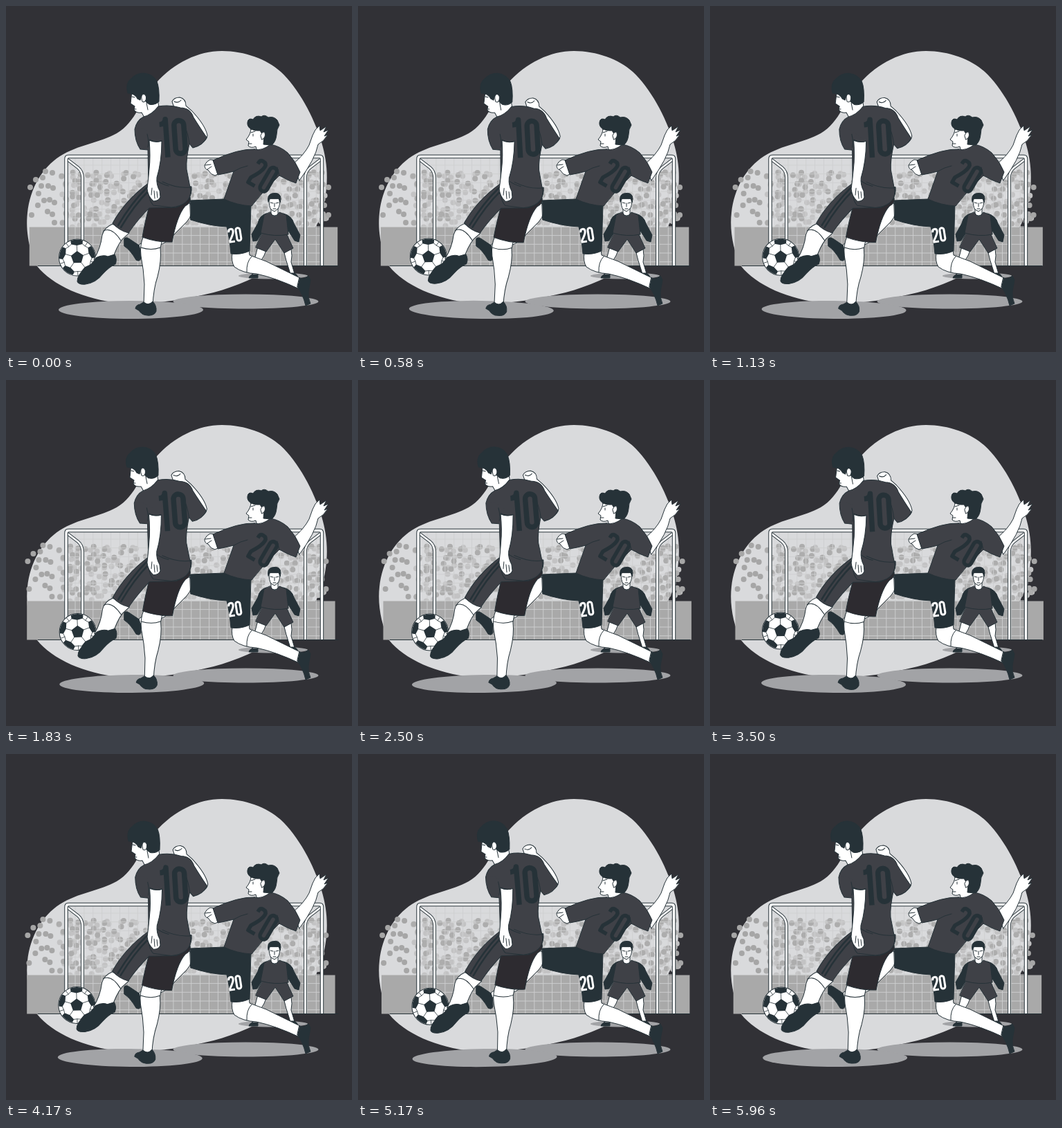
These frames come from a looping animation (500x500 px, 6000 ms). An HTML page:

```html
<!DOCTYPE html>
<html lang="en">
<head>
<meta charset="utf-8">
<title>Football match</title>
<style>
  html, body { margin: 0; width: 100%; height: 100%; overflow: hidden; background: #313136; }
  svg { display: block; width: 100vw; height: 100vh; }
  .line { stroke: #263238; stroke-width: 1; stroke-linejoin: round; stroke-linecap: round; }
  .skin { fill: #fff; }
  .shirt { fill: #3f4147; }
  .dark { fill: #263238; }
  .shorts { fill: #2d2b30; }
  .shade { fill: #a2a3a6; }
  .open { fill: none; }
  .digit { fill: none; stroke: #263238; stroke-linejoin: round; }
</style>
</head>
<body>
<svg viewBox="0 0 500 500">
  <defs>
    <clipPath id="ballClip"><circle r="26"/></clipPath>
    <path id="post" d="M87 375V221Q87 217.5 90.500 217.5H453Q456.500 217.500 456.500 221V375"/>
    <path id="stays" d="M89 222L104 233.500Q110.500 239 110.500 248V375M454.500 222L439.500 233.500Q432.500 239 432.500 248V375"/>
  </defs>

  <path fill="#d9dadc" d="M312 65C345 65 377 77 397 95C422 118 445 160 456 197C466 230 467 264 455 303C447 328 423 350 392 372C367 391 333 405 300 414C255 425 205 433 165 429C115 425 66 403 45 376C34 355 28 325 31 299C35 263 52 234 78 217C103 201 137 197 160 184C188 168 195 134 217 111C243 82 278 65 312 65Z"/>

  <g id="stand">
    <g id="crowd"></g>
    <path fill="#a9a9a9" d="M33.800 319.500H479.200V375.500H33.800Z"/>
  </g>

  <path id="net" fill="none" stroke="#cfd0d1" stroke-width=".9"/>
  <path class="line open" d="M46 375.500H480"/>
  <g fill="none" stroke-linejoin="round">
    <use href="#stays" stroke="#263238" stroke-width="4.600"/>
    <use href="#stays" stroke="#fff" stroke-width="2.800"/>
    <use href="#post" stroke="#263238" stroke-width="5.400"/>
    <use href="#post" stroke="#fff" stroke-width="3.400"/>
  </g>

  <!-- goalkeeper -->
  <ellipse class="shade" cx="386" cy="390" rx="50" ry="4.500"/>
  <g class="line">
    <path class="skin" d="M364 349L376 353Q373 362 369 367L363 389H356L360 363Z"/>
    <path class="skin" d="M402 355L412 351Q414 361 412 370L417 387H411L405 368Z"/>
    <path class="dark" d="M356 388H364V393H351Q351 390 356 388ZM411 386H417Q422 389 422 393H411Z"/>
    <path class="shirt" d="M371 326H404L415 350L402 357L389 337L376 355L361 349Z"/>
    <path class="dark" d="M376 300Q366 303 364 314L355 330L357 340L363 339L374 320ZM401 300Q413 303 416 314L425 331L423 341L417 339L405 320Z"/>
    <path class="skin" d="M383 292V301Q388 305 393 301V292Z"/>
    <path class="shirt" d="M382 298Q388 310 395 298L405 302L408 330Q389 334 368 328L373 302Z"/>
    <path class="skin" d="M380 279Q380 290 383 294L388 297L393 293Q396 289 396 279Z"/>
    <path class="dark" d="M379 283Q377 273 384 271Q397 268 397 279L396 284L394 278H382Z"/>
    <path class="open" d="M382 284L386 285M390 285L394 284M388 285V290M386 293H390"/>
  </g>

  <!-- defender -->
  <ellipse class="shade" cx="346.500" cy="427" rx="105" ry="10.500"/>
  <g class="line">
    <path class="dark" d="M171 336Q174 333 179 337L194 347L195 365Q193 370 188 367Q180 353 171 347Z"/>
    <path class="skin" d="M267 286Q272 300 261 312L245 328Q235 341 221 346L194 352L192 345Q211 333 219 325L236 297L250 282Z"/>
    <path class="skin" d="M327 357Q325 369 330 377Q342 386 362 387Q390 393 424 409L429 395Q396 379 376 369L352 360L351 352Z"/>
    <path class="open" d="M355 362Q347 370 348 385"/>
    <path class="dark" d="M424 393Q429 396 437 390L440 396L437 413Q436 421 440 430L433 433Q429 416 421 406Z"/>
    <path class="skin" d="M415 228Q431 215 438 201L443 187Q446 178 453 173L454 180L463 174L459 182L466 179L460 188L465 186Q459 196 451 200Q447 221 424 252Z"/>
    <path class="skin" d="M304 223L295 222Q290 224 287 230Q287 236 292 237Q296 244 302 245L308 242Z"/>
    <path class="open" d="M288 230L296 229M291 236L297 232"/>
    <path class="dark" d="M266 281L315 279L354 287L352 354Q339 360 325 358Q323 335 319 319Q294 318 267 309Z"/>
    <path class="skin" d="M354 177Q354 185 347 193L351 196L350 202Q354 206 361 203L363 211L384 205L386 180L370 172Z"/>
    <path class="shirt" d="M359 207Q370 210 382 200Q395 202 407 212Q419 225 425 240L419 256Q407 252 395 245Q374 264 355 289Q334 288 315 279L329 239Q318 242 306 244L299 223Q336 206 359 207Z"/>
    <path class="dark" d="M354 178Q348 174 349 168Q350 161 357 164Q361 157 369 160Q373 156 379 161Q387 159 392 165L395 172Q391 178 391 186Q390 196 384 201L372 200Q373 194 372 188L367 180Q360 181 354 178Z"/>
    <path class="skin" d="M368 187Q371 180 374 183Q376 190 370 193Z"/>
    <path class="open" d="M354 183L360 181M357 185V188M351 199H355M329 239Q339 233 349 231M395 245L392 233"/>
  </g>
  <g class="digit" stroke-width="5.500" transform="translate(371 246) rotate(30)">
    <path d="M-15 -12V-14Q-15 -19 -10 -19Q-4 -19 -4 -13Q-4 -5 -14 10V18H-3"/>
    <rect x="4" y="-19" width="11" height="38" rx="5.500"/>
  </g>
  <g class="digit" style="stroke:#fff" stroke-width="3" transform="translate(330.500 331) rotate(-9)">
    <path d="M-8 -5Q-8 -9.500 -5 -9.500Q-1.500 -9.500 -1.500 -6Q-1.500 -2 -8 7V9H-1"/>
    <rect x="2.500" y="-9.500" width="6" height="18.500" rx="3"/>
  </g>

  <!-- striker and ball -->
  <g id="striker">
    <ellipse class="shade" cx="180.500" cy="439" rx="104.500" ry="13"/>
    <g id="ball" transform="translate(103 363.500)"></g>
    <g class="line">
      <path class="skin" d="M154 315Q142 320 139 331Q137 350 127 366L154 366Q159 349 168 337L178 328Z"/>
      <path class="open" d="M141 325Q153 319 166 339"/>
      <path class="dark" d="M130 364Q140 359 147 362L157 359Q161 366 158 373Q149 377 140 387Q130 400 115 402Q105 403 103 398Q103 389 113 381Q124 374 130 364Z"/>
      <path class="skin" d="M199 332Q193 345 195 361Q199 381 200 402L199 432L212 433Q213 409 219 391Q225 368 223 350L226 336Z"/>
      <path class="open" d="M195 349Q210 354 223 349"/>
      <path class="dark" d="M199 428Q206 434 212 427Q218 433 217 441Q214 448 204 447Q197 447 192 440L187 437Q188 432 194 431Z"/>
      <path class="shorts" d="M209 282L266 276Q268 284 259 289Q247 303 240 341Q219 342 197 334Q201 310 209 282Z"/>
      <path class="shirt" d="M206 256L268 261Q270 282 246 291L207 292Q190 309 177 328Q164 325 154 314Q172 281 206 256Z"/>
      <path class="open" style="stroke-width:2.500" d="M203 263Q181 285 162 317M206 267Q185 288 166 320"/>
      <path class="skin" d="M243 147L240 138Q243 132 251 132Q260 134 260 144L268 151Q288 172 291 187Q290 195 282 197L258 185Z"/>
      <path class="open" d="M243 138Q249 141 253 136"/>
      <path class="skin" d="M182 123L180 141L186 145L185 150Q188 155 196 154L201 163L222 152L218 128L200 117Z"/>
      <path class="shirt" d="M199 160Q211 157 220 145Q237 142 252 147Q266 147 271 161Q279 174 290 190Q284 202 270 205L265 199Q260 222 261 236Q264 251 267 267Q267 288 239 291L213 288Q205 280 206 260L205 208L194 207Q186 195 186 178Q189 165 199 160Z"/>
      <path class="dark" d="M176 126Q172 112 181 105Q188 97 199 97Q212 98 218 109Q222 119 221 138Q215 144 207 142L203 139Q198 134 199 127Q195 130 194 136L190 134Q186 126 176 126Z"/>
      <path class="skin" d="M196 134Q195 128 199 127Q204 129 202 136Q200 140 197 138Z"/>
      <path class="open" d="M182 131L186 132M185 149H188M203 140L205 150M265 199Q263 184 259 176M210 243Q216 255 235 260M226 254Q247 264 266 262"/>
      <path class="skin" d="M207 194Q216 198 225 195Q225 225 218 248Q217 258 222 267L223 276Q221 282 213 282Q205 275 204 264Q206 248 207 235Q209 217 207 194Z"/>
      <path class="open" d="M211 263L210 273M214 267L215 278M218 268L219 277"/>
      <path class="shirt" style="stroke:none" d="M189 176Q202 177 210 184L225 194Q216 197 207 193L203 203L194 206Q187 193 189 176Z"/>
      <path class="open" d="M207 193Q216 198 225 195M205 204Q207 197 204 185"/>
    </g>
    <g class="digit" stroke-width="7.500" transform="translate(242 190) rotate(-4)">
      <path d="M-19 -20Q-11 -20 -10 -27V28"/>
      <rect x="2" y="-24" width="14" height="48" rx="7"/>
    </g>
  </g>
</svg>

<script>
const $ = id => document.getElementById(id);
const LOOP = 6000, SWAY = 3000;

let seed = 11;
const random = () => (seed = seed * 16807 % 2147483647) / 2147483647;

// Spectators: scattered loners at the edges, a jittered crowd between them
function buildCrowd() {
  const edge = [[35,262],[43,251],[53,248],[57,239],[67,241],[51,260],[61,260],[68,263],[47,271],
    [37,302],[46,288],[55,281],[63,280],[70,284],[60,297],[67,301],[70,313],[466,262],[466,302],[460,288]];
  const dot = (x, y, fill) => `<circle cx="${x}" cy="${y}" r="4" fill="${fill}"/>`;
  let pale = '', heads = '';
  for (let y = 242; y < 318; y += 11.500) {
    for (let x = 80; x < 456; x += 12) {
      pale += dot(x + random() * 12, y + random() * 10, '#c3c3c4');
      if (random() < .75) heads += dot(x + random() * 10, y + random() * 9 - 4, '#adadad');
    }
  }
  $('crowd').innerHTML = pale + heads + edge.map(([x, y]) => dot(x, y, '#a6a6a6')).join('');
}

function buildNet() {
  let d = '';
  for (let x = 100; x < 454; x += 12.900) d += `M${x} 220V375`;
  for (let y = 230; y < 375; y += 12.700) d += `M89 ${y}H454`;
  $('net').setAttribute('d', d);
}

function buildBall() {
  const at = (r, deg) => {
    const a = deg * Math.PI / 180;
    return [r * Math.cos(a), r * Math.sin(a)];
  };
  const spokes = [0, 1, 2, 3, 4].map(i => -92 + i * 72);
  const polygon = pts => `M${pts.join('L')}Z`;
  let patches = polygon(spokes.map(a => at(9.500, a))), seams = '';
  for (const a of spokes) {
    patches += polygon([at(17.500, a), at(21, a + 23), at(28, a + 19), at(28, a - 19), at(21, a - 23)]);
    seams += `M${at(9, a)}L${at(17.500, a)}M${at(21, a + 23)}L${at(20, a + 36)}L${at(21, a + 49)}M${at(20, a + 36)}L${at(26, a + 36)}`;
  }
  $('ball').innerHTML = `<circle r="26.500" fill="#fff"/><g clip-path="url(#ballClip)">
    <path d="${patches}" class="dark"/><path d="${seams}" class="line open" style="stroke-width:.8"/></g>
    <circle r="26.500" class="line open"/>`;
}

// Linear interpolation through [phase, value] keys
function track(keys, phase) {
  const i = keys.findIndex(k => k[0] > phase);
  const [p0, v0] = keys[i - 1], [p1, v1] = keys[i];
  return v0 + (v1 - v0) * (phase - p0) / (p1 - p0);
}
const shake = [0, -1, 2, -4, 4, -4, 4, -4, 2, -1, 0].map((v, i) => [i / 10, v]);
const sway = [[0, 0], [.25, 1], [.75, -1], [1, 0]];

function draw(now) {
  const shift = track(shake, now % LOOP / LOOP);
  const angle = track(sway, now % SWAY / SWAY);
  $('stand').setAttribute('transform', `translate(${shift} 0)`);
  $('striker').setAttribute('transform', `rotate(${angle} 183.500 274.500)`);
}

buildCrowd();
buildNet();
buildBall();
const start = performance.now();
(function frame() {
  draw(Math.max(0, performance.now() - start));
  requestAnimationFrame(frame);
})();
</script>
</body>
</html>
```
